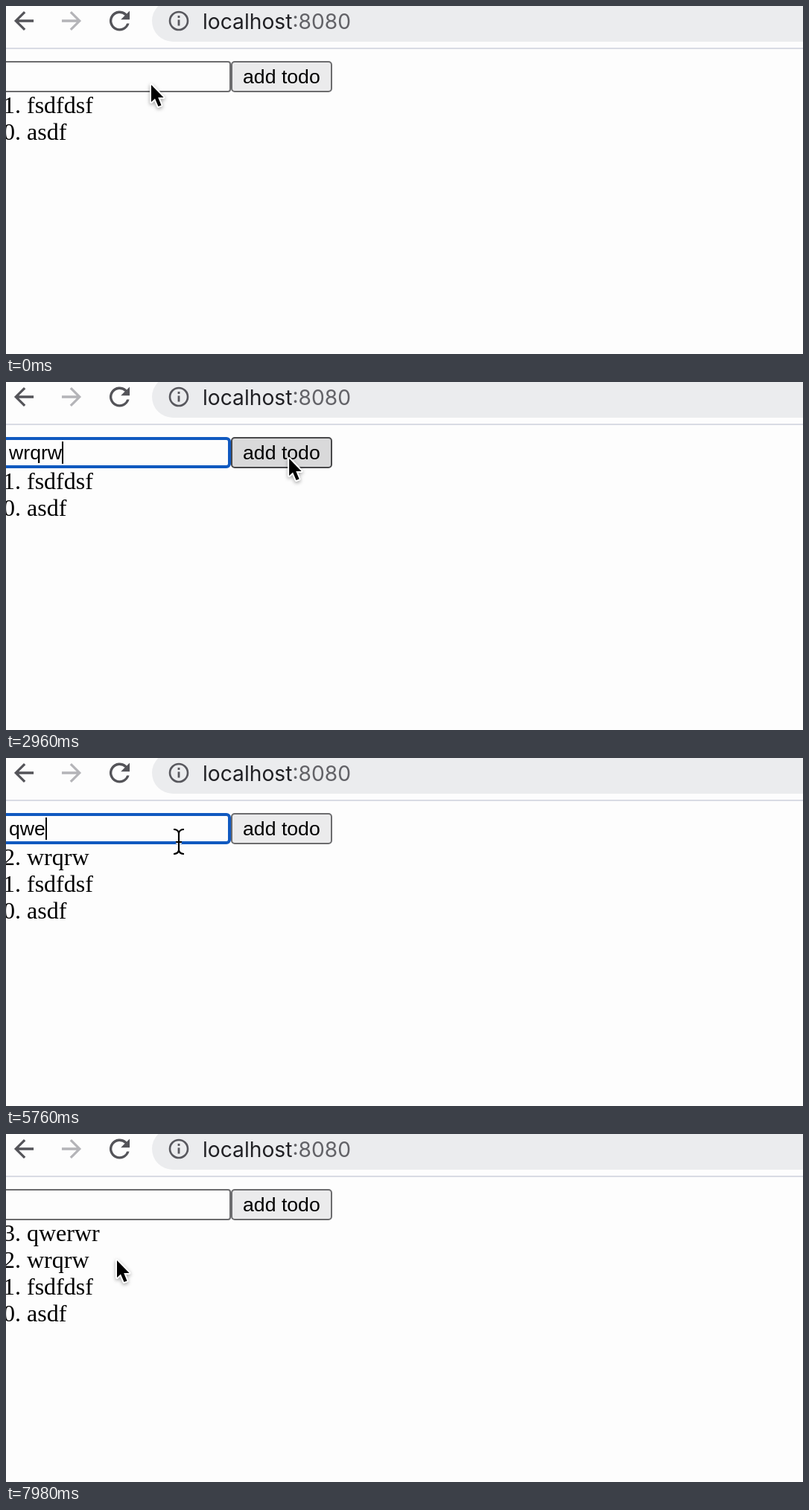
Write an HTML page with a canvas that moves like this. It is 1070 by 468 pixels and loops after 8000 ms.

```html
<!DOCTYPE html>
<html lang="en">
<head>
<meta charset="utf-8">
<title>Todo list</title>
<style>
  html, body { margin: 0; width: 100%; height: 100%; overflow: hidden; background: #fdfdfd; }
  canvas { display: block; }
</style>
</head>
<body>
<canvas id="stage" width="1070" height="468"></canvas>
<script>
const ctx = document.getElementById('stage').getContext('2d');
const LOOP = 8000;
const PAGE = '#fdfdfd';
const UI_FONT = '26.667px "Liberation Sans", Arial, sans-serif';
const LIST_FONT = '32px "Liberation Serif", "Times New Roman", serif';
const URL_FONT = '28.2px Inter, sans-serif';

// Pointer path: time, x, y
const pointerPath = [
  [0, 194, 104], [420, 190, 96], [1540, 190, 96], [1840, 312, 95],
  [2260, 330, 96], [2360, 330, 96], [2960, 379, 101], [3200, 409, 103],
  [4180, 409, 103], [4700, 231, 112], [6040, 231, 112], [6220, 284, 107],
  [6460, 358, 98], [6840, 368, 100], [7080, 368, 100], [7420, 269, 147],
  [7580, 258, 156], [7680, 258, 156], [7980, 148, 168]
];

const presses = [[740, 900], [3220, 3360], [4740, 5000], [6900, 7040]];

// Each session lasts from focusing the field to pressing the button
const sessions = [
  { focus: 740, blur: 3220, submit: 3360, text: 'wrqrw', keys: [1540, 1700, 1960, 2120, 2520] },
  { focus: 4740, blur: 6900, submit: 7040, text: 'qwerwr', keys: [5480, 5560, 5680, 5780, 5860, 6060] }
];

const icons = {
  back: new Path2D('M20 11H7.83l5.59-5.59L12 4l-8 8 8 8 1.41-1.41L7.83 13H20z'),
  forward: new Path2D('M12 4l-1.41 1.41L16.17 11H4v2h12.17l-5.58 5.59L12 20l8-8z'),
  reload: new Path2D('M17.65 6.35A8 8 0 1 0 19.73 14h-2.08A6 6 0 1 1 16.22 7.78L13 11h7V4z')
};
const arrow = new Path2D('M1 2V25L6 20.5L10.5 31L14.5 29.5L10.2 19H17.5Z');
const beam = new Path2D('M-7-16Q-1-16 0-11Q1-16 7-16M0-11V12M-7 17Q-1 17 0 12Q1 17 7 17M-4 1H4');

function pointerAt(t) {
  const next = pointerPath.findIndex(p => p[0] > t);
  if (next < 0) return pointerPath.at(-1).slice(1);
  const [t0, x0, y0] = pointerPath[next - 1];
  const [t1, x1, y1] = pointerPath[next];
  const k = (t - t0) / (t1 - t0);
  return [x0 + (x1 - x0) * k, y0 + (y1 - y0) * k];
}

function label(text, x, y, font, color = '#000') {
  ctx.font = font;
  ctx.fillStyle = color;
  ctx.fillText(text, x, y);
  return ctx.measureText(text).width;
}

function box(x, y, w, h, radius, fill, stroke, line) {
  ctx.beginPath();
  ctx.roundRect(x, y, w, h, radius);
  ctx.fillStyle = fill;
  ctx.fill();
  if (!stroke) return;
  ctx.strokeStyle = stroke;
  ctx.lineWidth = line;
  ctx.stroke();
}

function icon(path, x, y, scale, color) {
  ctx.save();
  ctx.translate(x, y);
  ctx.scale(scale, scale);
  ctx.translate(-12, -12);
  ctx.fillStyle = color;
  ctx.fill(path);
  ctx.restore();
}

function drawToolbar() {
  icon(icons.back, 24, 20, 1.63, '#545459');
  icon(icons.forward, 88, 20, 1.63, '#b4b4b8');
  icon(icons.reload, 152.5, 20, 1.69, '#545459');
  box(196, -8, 920, 56, 28, '#ebecee');
  ctx.strokeStyle = ctx.fillStyle = '#58585e';
  ctx.lineWidth = 2.6;
  ctx.beginPath();
  ctx.arc(232, 20, 12, 0, Math.PI * 2);
  ctx.stroke();
  ctx.fillRect(230.6, 13, 2.8, 3);
  ctx.fillRect(230.6, 18.5, 2.8, 8);
  const hostWidth = label('localhost', 264, 30.5, URL_FONT, '#202024');
  label(':8080', 264 + hostWidth, 30.5, URL_FONT, '#626267');
  ctx.fillStyle = '#d9dbe4';
  ctx.fillRect(0, 56, 1070, 2);
}

function drawField(t) {
  const session = sessions.find(s => t >= s.focus && t < s.submit);
  const focused = session && t < session.blur;
  if (focused) box(-20, 76, 320, 38, 4, PAGE, '#1059c0', 4);
  else box(-20, 75, 321, 40, 3, PAGE, '#6c6c6e', 2);
  if (!session) return;

  const typed = session.keys.filter(k => k <= t);
  const width = label(session.text.slice(0, typed.length), 4, 104, UI_FONT);
  const lastInput = typed.at(-1) ?? session.focus;
  if (focused && Math.floor((t - lastInput) / 500) % 2 === 0) {
    ctx.fillStyle = '#000';
    ctx.fillRect(Math.round(4 + width), 80, 2, 30);
  }
}

function drawButton(hovered) {
  box(303, 75, 134, 40, 4, hovered ? '#d9d9da' : '#ebebec', hovered ? '#48484a' : '#6c6c6e', 2);
  label('add todo', 318, 104, UI_FONT);
}

function drawList(t) {
  const todos = ['asdf', 'fsdfdsf'];
  for (const s of sessions) if (t >= s.submit) todos.push(s.text);
  todos.forEach((todo, i) => {
    label(`${i}. ${todo}`, -4, 144 + (todos.length - 1 - i) * 36, LIST_FONT);
  });
}

function drawPointer(x, y, overField, pressed) {
  ctx.save();
  ctx.translate(x, y);
  if (pressed) {
    ctx.beginPath();
    ctx.arc(0, 0, 33, 0, Math.PI * 2);
    ctx.strokeStyle = '#000';
    ctx.lineWidth = 3;
    ctx.stroke();
  }
  ctx.lineJoin = 'round';
  if (overField) {
    ctx.translate(1, 0);
    ctx.strokeStyle = '#fff';
    ctx.lineWidth = 4.5;
    ctx.stroke(beam);
    ctx.strokeStyle = '#000';
    ctx.lineWidth = 2.2;
    ctx.stroke(beam);
  } else {
    ctx.shadowColor = 'rgba(0, 0, 0, 0.35)';
    ctx.shadowBlur = 5;
    ctx.shadowOffsetY = 2;
    ctx.strokeStyle = '#fff';
    ctx.lineWidth = 4;
    ctx.stroke(arrow);
    ctx.shadowColor = 'transparent';
    ctx.fillStyle = '#000';
    ctx.fill(arrow);
  }
  ctx.restore();
}

function draw(t) {
  const [x, y] = pointerAt(t);
  const inRow = y > 75 && y < 115;
  const overField = inRow && x < 302 && t > 100;
  const overButton = inRow && x >= 302 && x < 438;
  const pressed = presses.some(([down, up]) => t >= down && t < up);

  ctx.fillStyle = PAGE;
  ctx.fillRect(0, 0, 1070, 468);
  drawToolbar();
  drawField(t);
  drawButton(overButton);
  drawList(t);
  drawPointer(x, y, overField, pressed);
}

const start = performance.now();
function tick() {
  draw((performance.now() - start) % LOOP);
  requestAnimationFrame(tick);
}
tick();
</script>
</body>
</html>
```
